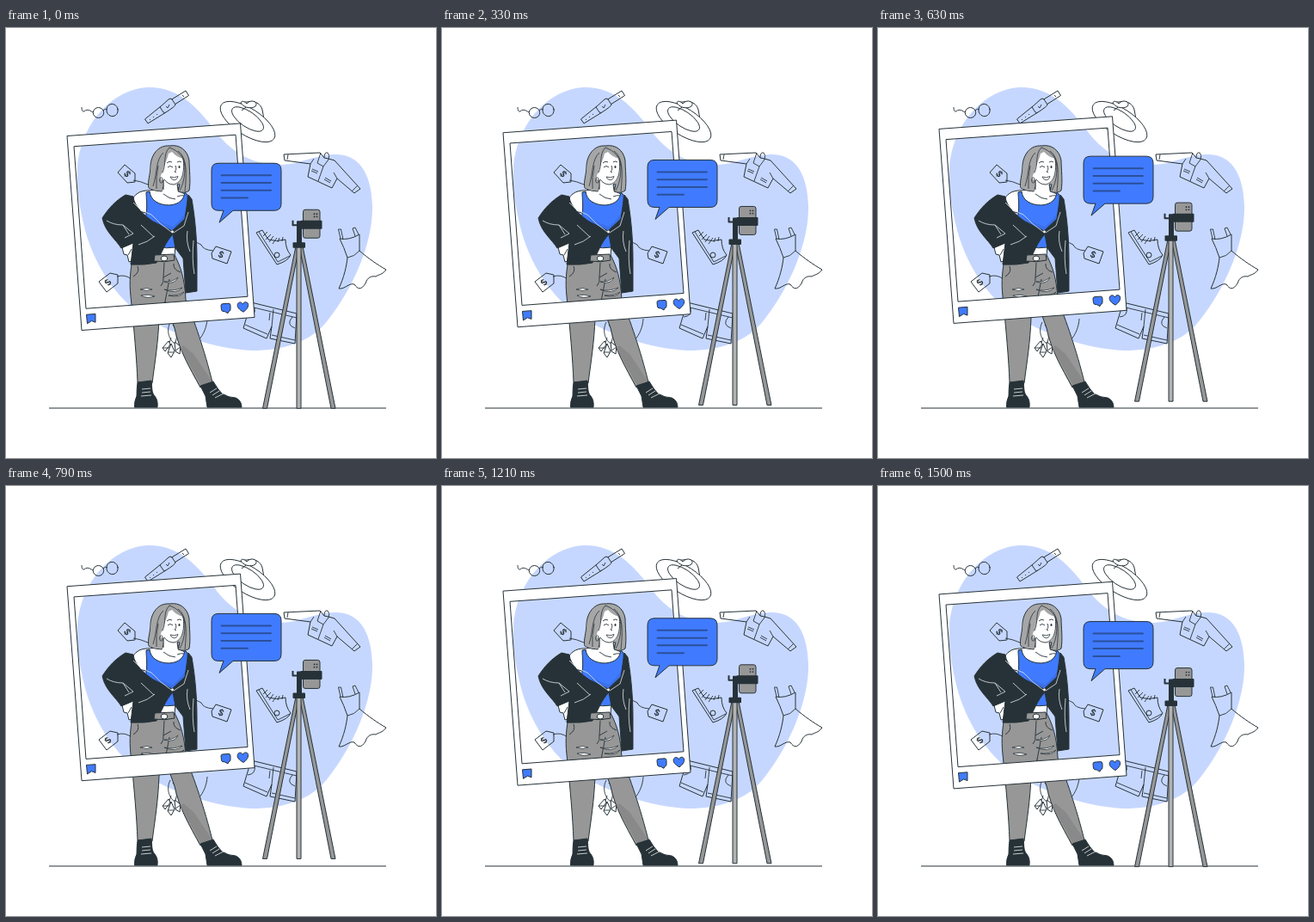
An HTML page with a canvas for the animation above (1540 ms loop, 500 px wide and 500 px high).

```html
<!DOCTYPE html>
<html lang="en">
<head>
<meta charset="utf-8">
<style>
  html, body { margin: 0; width: 100%; height: 100%; overflow: hidden; background: #fff; }
  canvas { display: block; width: 500px; height: 500px; }
</style>
</head>
<body>
<canvas id="stage"></canvas>
<script>
const INK = '#263238', BLUE = '#407bff', PALE = '#c6d7ff';
const GREY = '#979797', HAIR = '#a6a6a6', SHADE = '#898989', WHITE = '#fff';
const LOOP = 1540, STEPS = 37, RISE = 10;

const canvas = document.getElementById('stage');
const ratio = window.devicePixelRatio || 1;
canvas.width = canvas.height = 500 * ratio;
const ctx = canvas.getContext('2d');

function shape(path, fill, stroke = INK, width = 1) {
  const p = new Path2D(path);
  if (fill) { ctx.fillStyle = fill; ctx.fill(p, 'evenodd'); }
  if (stroke) { ctx.strokeStyle = stroke; ctx.lineWidth = width; ctx.stroke(p); }
}
const line = (path, color = INK, width = 0.9) => shape(path, null, color, width);

function oval(x, y, rx, ry, turn = 0, fill = null, stroke = INK, width = 1) {
  ctx.beginPath();
  ctx.ellipse(x, y, rx, ry, turn, 0, Math.PI * 2);
  if (fill) { ctx.fillStyle = fill; ctx.fill(); }
  if (stroke) { ctx.strokeStyle = stroke; ctx.lineWidth = width; ctx.stroke(); }
}

function roundBox(x, y, w, h, r, fill, stroke = INK, width = 1) {
  ctx.beginPath();
  ctx.roundRect(x, y, w, h, r);
  ctx.fillStyle = fill;
  ctx.fill();
  if (stroke) { ctx.strokeStyle = stroke; ctx.lineWidth = width; ctx.stroke(); }
}

function dollar(x, y, degrees) {
  ctx.save();
  ctx.translate(x, y);
  ctx.rotate(degrees * Math.PI / 180);
  ctx.font = '600 10px Inter, sans-serif';
  ctx.textAlign = 'center';
  ctx.textBaseline = 'middle';
  ctx.fillStyle = INK;
  ctx.fillText('$', 0, 0);
  ctx.restore();
}

function drawBackdrop() {
  shape('M165 69C199 68 222 91 242 118C260 143 286 160 321 159C347 157 359 147 385 147C414 148 425 174 426 207C427 248 405 301 374 340C355 365 323 375 286 375C242 373 196 357 161 336C125 312 102 272 92 235C86 211 82 190 83 164C86 111 124 71 165 69Z', PALE, null);
  line('M50 442H442', INK, 1);
}

function drawAccessories() {
  // glasses
  oval(107.5, 98.5, 6.2, 6);
  oval(123.5, 95.5, 6.6, 7.2, -0.2);
  line('M101 98Q94 93 91 97Q88 98 88 92M113 96Q115 93 118 95M129 94L131 95');

  // watch
  shape('M180 91L161.5 106L165 111L186 98M191 84L209 73L212.5 78.5L196 89');
  shape('M179 92L189 83Q191 81 193 83L197 89Q197 91 186 98Q184 99 183 98Z', PALE);
  line('M186 91L188 93L190 89M167 106L168 107M171 103L172 104M175 100L176 101M205 78L207 80');

  // hat
  shape('M271 94C270 88 273 86 280 86C290 84 296 88 298 95L300 106Z', WHITE);
  oval(281, 109, 36.5, 15.5, 0.57, WHITE);
  oval(281, 106, 21.5, 9, 0.6);
  shape('M279 92C269 87 274 82 280 88C285 82 294 86 290 91Q286 94 279 92ZM279 92L274 96', WHITE);

  // denim jacket
  shape('M323 147L365 145L370 151L375 152L382 154L412 187L405 192L385 175L379 186L351 173L354 158L324 154Z');
  line('M328 147L327 153M366 145L362 157L369 161M370 151Q370 144 374 145Q377 148 375 153L369 161L363 178M402 190L409 183M356 164L363 167M355 166L362 169M370 176L377 180M371 174L378 178M354 158L358 152M385 175L381 168');

  // ankle boot
  shape('M291 238L298 235L305 246Q314 249 325 246Q325 257 331 264Q328 271 315 275Z');
  line('M294 237L316 272L330 265M299 242L304 237M302 246L308 240M306 249L311 242M310 251L315 244M316 249L318 244M321 248L322 243');
  oval(315, 264, 3, 3);

  // dress
  shape('M388 245Q399 247 411 240L411 259C420 267 433 276 442 281C438 287 432 287 430 289C425 288 420 290 418 297C413 305 409 304 405 298C399 296 394 304 387 303C393 290 396 277 397 267Q393 255 388 245Z');
  line('M389 245L386.5 234H389.5L392 246M406 242L403 233L406 232L410 240M397 267Q405 266 411 259');

  // shorts
  shape('M285 319L338 332L336 367L307 361L309 347L303 361L276 349Z');
  line('M284 324L338 337M311 327L309 347M289 325Q291 335 281 336M333 336Q325 345 336 349M278 345L304 356M309 357L336 363M307 331L306 340');

  // handbag with charm
  line('M191 342C185 354 191 367 203 371C219 374 233 357 234 338');
  line('M194 345Q201 354 197 366M192 360L190 366');
  shape('M189 364L182 372L185 376L191 368ZM192 367L188 378L192 383L196 376ZM196 365L197 376L202 379L203 370Z', WHITE);
  line('M182 372L190 372M188 377L195 377M197 375L203 371');

  // price tags
  line('M148 177Q156 178 165 182M129 289Q138 286 146 292M241 259Q229 258 227 252L217 247');
  shape('M130 168L138 159L150 169L150 179L141 180Z');
  shape('M108 295L121 285L130 287L130 297L117 307Z');
  shape('M239 262L244 254L262 260L257 274L240 268Z');
  dollar(140.5, 170, 52);
  dollar(119, 296, -52);
  dollar(250, 264, 22);
}

function drawLegs() {
  shape('M147 268L196 264C203 277 208 292 209 316C218 338 231 375 240 412L226 418C213 394 201 374 196 349L185 318L178 337C177 366 173 389 170 413L153 412C152 385 149 351 145 312C143 294 145 281 147 268Z', GREY);
  shape('M206 369L218 379L239 410L227 416C218 399 208 382 203 372Z', SHADE, null);
  line('M184 273L183 290Q184 296 180 300M183 290L192 285M185 318L190 292M153 277Q156 284 148 289M195 274Q194 281 203 284');
  shape('M184 295Q193 296 200 290Q196 299 184 295ZM184 304Q193 307 205 302Q198 310 184 304ZM189 311Q200 312 207 307Q203 314 189 311ZM156 304Q164 301 170 304Q164 307 156 304ZM157 311Q166 309 173 312Q164 315 157 311Z', WHITE, INK, 0.8);

  shape('M153 412L169 410C170 418 169 424 173 428Q177 433 176 441H149.5Q149 434 152 428Q152 419 153 412Z', INK);
  shape('M226 416L241 411Q246 420 251 425Q259 430 267 430Q274 433 274 441H234L232 428Z', INK);
  line('M158 420L168 419M158 424L168 423M157 428L169 427M237 424L245 419M240 427L248 422M243 430L253 425', '#d9dcdd', 0.9);
}

function drawTorso() {
  // neck and shoulders
  shape('M183 177L183 186C174 191 160 186 152 193C144 199 147 208 154 213L199 223L212 207C213 197 208 192 201 190L199 180Z', WHITE);
  shape('M176 251L197 252L196 266L172 265Z', WHITE);
  // top
  shape('M167 190C168 200 177 206 190 206C202 205 207 199 208 191L211 194L212 218L197 239L197 255Q186 257 177 254L184 239L162 222C165 210 163 199 163 191Z', BLUE);
  line('M183 193Q190 199 197 199M199 196Q204 194 207 195');
  shape('M169 219Q184 228 194 231Q204 223 211 211L212 218L197 239L184 239Z', '#3a70e8', null);

  // hand on the hip
  shape('M135 255L149 249L149 262L146 271L143 272L141 264L137 263Z', WHITE);
  line('M142 264L146 257');

  // jacket
  shape('M139 194L148 196C149 208 161 218 171 225L193 236L208 222L212 194L216 199C220 222 222 246 222 270L222 306L209 308L206 268L197 256L194 240C185 249 181 262 175 273Q161 276 145 275L148 250L134 256C128 246 115 237 112 221C119 210 127 201 139 194Z', INK);
  line('M148 203Q157 213 169 217Q181 230 192 237M117 224Q125 229 136 229L148 239M136 229L143 240M157 229L172 243M154 252Q165 249 173 242M195 238L207 230L212 214M211 236Q209 248 214 260M218 247Q216 270 219 286M138 244L148 239', '#e5e8ea', 0.8);
  oval(193.5, 237, 1.4, 1.4, 0, WHITE, null);

  // belt
  shape('M173 264L195 263L196 270Q185 273 172 271Z', GREY);
  oval(184, 268, 3.8, 3, 0, WHITE);
}

function drawHead() {
  shape('M190 137C177 136 169 147 168 160C168 171 164 179 166 186Q173 190 181 190L185 180L202 182L200 190Q208 193 213 189C215 178 213 164 213 154C211 142 202 135 190 137Z', HAIR);
  // face and neck
  shape('M189 146C187 155 183 160 182 169Q178 169 179 174Q181 178 184 176L183 188Q192 193 200 189L199 181C206 178 209 163 206 152Q198 150 193 144Z', WHITE, null);
  line('M184 176Q188 182 195 182C205 180 208 167 206 152M183 177L183 188M199 182L200 189');
  shape('M190 139C181 145 185 158 181 168Q178 177 182 189C174 190 168 187 166 185C168 175 168 164 169 157C172 145 180 139 190 139Z', HAIR, null);
  line('M190 139C182 147 187 158 182 168M190 139C201 143 207 150 208 161C208 173 206 182 202 189M183 145C174 153 176 168 171 184M177 160Q174 174 175 187M200 143C211 151 210 170 208 190', INK, 0.8);
  line('M188 162Q191 159 194 162M187 157Q190 154 193 156M199 156Q202 154 204 156M197 160Q199 165 196 167L198 168', INK, 0.9);
  oval(201.5, 161.5, 1, 1.5, 0, INK, null);
  shape('M191 173Q196 175 200 172.5Q199 177 195 176.7Q192 176 191 173Z', WHITE, INK, 0.8);
  oval(180.5, 177, 1.8, 3.2, 0, null, INK, 0.8);
}

function drawPhotoFrame() {
  shape('M71 125.8L272.5 111.2L289 336.7L88 351.8ZM79 138L267 124.5L281 312.5L93 326.5Z', WHITE);
  shape('M93.5 333.5L104 332.7V342.5L99.5 340.8L94.5 344Z', BLUE);
  shape('M252 321L259 320.5Q261 320.5 261 323L261 327.5Q261 329.5 259 329.7L258 332L254.5 330Q250.5 330 250.5 328L250 323Q250 321 252 321Z', BLUE);
  shape('M276 330.5C271 327.5 268.5 325 269.3 321.5C270.5 318 274.5 318.8 275.3 321.5C276.5 318.2 281 318 281.6 321.5C282 325.5 279 328.3 276 330.5Z', BLUE);
}

function drawBubble() {
  shape('M247 157.5H312Q320 157.5 320 165.5V204.5Q320 212.5 312 212.5H264L248 226.5L253 212.5H247Q239 212.5 239 204.5V165.5Q239 157.5 247 157.5Z', BLUE);
  ctx.lineCap = 'round';
  line('M250.5 171.5H308M250.5 180.3H308M250.5 189H308M250.5 197.8H281', '#2b4f9b', 2);
  ctx.lineCap = 'butt';
}

function drawTripod() {
  shape('M337 254L341 254L303.5 442.5H298.5Z', GREY);
  shape('M341 254L345 254L383 442.5H378Z', GREY);
  shape('M338 254H343V442.5H338Z', '#b3b3b3');
  roundBox(345.5, 211.5, 19.5, 33, 2.5, GREY);
  for (const [x, y] of [[358.5, 216.5], [361.5, 216.5], [358.5, 219.7], [361.5, 219.7]]) {
    oval(x, y, 0.9, 0.9, 0, INK, null);
  }
  roundBox(342.5, 224, 25, 10, 1, INK, null);
  roundBox(338, 224.5, 6, 27, 1, INK, null);
  line('M333.5 224V229.5H340', INK, 2);
  roundBox(333.5, 249.5, 14.5, 6.5, 1, INK, null);
}

// Linear bob, stepped at 24 pictures a second.
function liftAt(ms) {
  const step = Math.floor((ms % LOOP) / LOOP * STEPS);
  const phase = (step / STEPS + 0.023) % 1;
  return 0.2 - RISE * (1 - Math.abs(1 - 2 * phase));
}

function render(ms) {
  ctx.setTransform(ratio, 0, 0, ratio, 0, 0);
  ctx.lineJoin = 'round';
  ctx.fillStyle = WHITE;
  ctx.fillRect(0, 0, 500, 500);
  drawBackdrop();
  drawAccessories();
  drawLegs();
  drawTorso();
  drawHead();
  ctx.translate(0, liftAt(ms));
  drawPhotoFrame();
  drawBubble();
  drawTripod();
}

const start = performance.now();
function tick() {
  render(performance.now() - start);
  requestAnimationFrame(tick);
}
tick();
</script>
</body>
</html>
```
